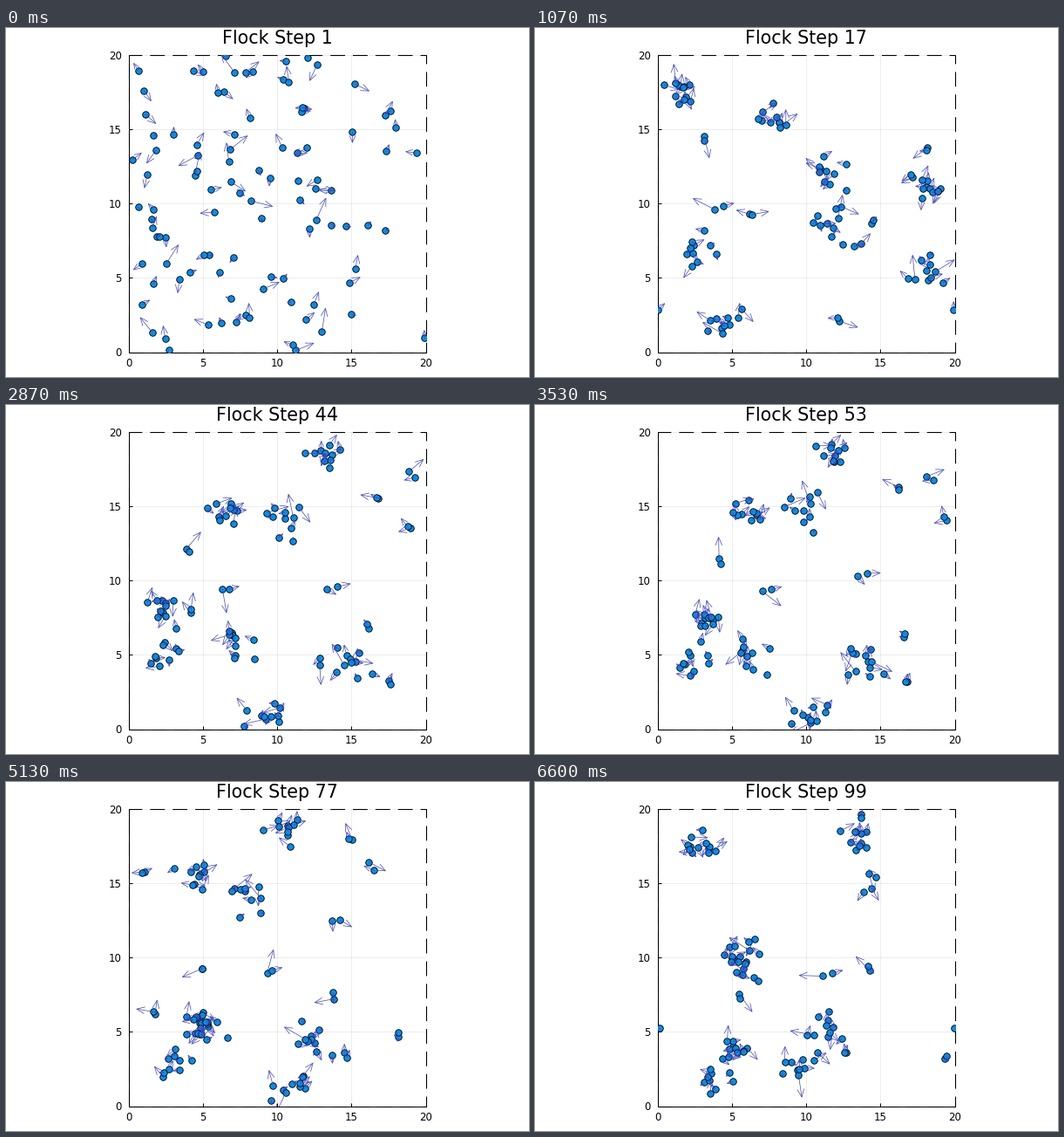
Animation of 600 by 400 pixels, one loop 6.67 s. Source, as a matplotlib script:

```python
import numpy as np
import matplotlib.pyplot as plt
from matplotlib.animation import FuncAnimation
from matplotlib.collections import LineCollection

W, H, DPI = 600, 400, 100
STEPS, LOOP = 100, 6670
SIDE = 20
LEFT, TOP, BOX = 141, 31, 340.5
UNIT = BOX / SIDE
PX = 72 / DPI
GATHERED = 17

rng = np.random.default_rng(11)

# Each flock glides on a parabola through its centre at three moments
MOMENTS = np.array([28, 64, 100])
CENTRES = np.array([
    [(7.2, 15.2), (5.3, 15.0), (2.8, 17.9)],
    [(17.3, 18.0), (10.5, 18.7), (13.4, 18.0)],
    [(11.2, 11.2), (9.0, 14.7), (5.6, 9.6)],
    [(9.5, 9.0), (5.5, 4.8), (5.7, 10.0)],
    [(2.3, 6.0), (2.4, 3.7), (3.8, 1.7)],
    [(6.9, 1.6), (11.0, 1.2), (9.5, 3.0)],
    [(16.6, 4.6), (13.0, 4.0), (11.2, 5.0)],
    [(0.2, 9.8), (4.2, 6.4), (5.3, 3.8)],
])
FLOCKS, FLOCK_SIZE = len(CENTRES), 10
PAIRS = 10
N = FLOCKS * FLOCK_SIZE + PAIRS * 2


def polar(r, a):
    return np.stack([r * np.cos(a), r * np.sin(a)], axis=-1)


def wrapped(d):
    return (d + SIDE / 2) % SIDE - SIDE / 2


def paths():
    """Quadratic coefficients for the flocks and the straight-flying pairs."""
    knots = CENTRES.transpose(1, 0, 2).reshape(len(MOMENTS), -1)
    curved = np.polyfit(MOMENTS, knots, 2).reshape(3, FLOCKS, 2)
    place = rng.uniform(0, SIDE, (PAIRS, 2))
    speed = polar(0.09, rng.uniform(0, 2 * np.pi, PAIRS))
    straight = np.stack([0 * speed, speed, place])
    return np.concatenate([curved, straight], axis=1)


PATHS = paths()
group = np.repeat(np.arange(FLOCKS + PAIRS),
                  [FLOCK_SIZE] * FLOCKS + [2] * PAIRS)
spread = np.where(group < FLOCKS, 0.65, 0.2)[:, None]
offset = rng.normal(0, spread, (N, 2))
phase = rng.uniform(0, 2 * np.pi, (N, 2))

reach = np.clip(rng.rayleigh(0.55, N), 0.15, 1.6)
aim = rng.uniform(0, 2 * np.pi, N)
turn = rng.normal(0, 0.04, N)


def flocked(step):
    a, b, c = PATHS
    centre = (a * step + b) * step + c
    sway = 0.4 * spread * np.sin(0.15 * step + phase)
    return centre[group] + offset + sway


def nearest_starts(goal):
    """Scatter the birds, then swap starts while that shortens the trips."""
    home = rng.uniform(0, SIDE, (N, 2))
    cost = (wrapped(goal[:, None] - home[None]) ** 2).sum(axis=2)
    pick = np.arange(N)
    for _ in range(6):
        for i in range(N):
            for j in range(i):
                a, b = pick[i], pick[j]
                if cost[i, b] + cost[j, a] < cost[i, a] + cost[j, b]:
                    pick[i], pick[j] = b, a
    return home[pick]


GOAL = flocked(GATHERED)
HOME = nearest_starts(GOAL)


def positions(step):
    if step < GATHERED:
        u = (step - 1) / (GATHERED - 1)
        return (HOME + u * wrapped(GOAL - HOME)) % SIDE
    return flocked(step) % SIDE


def arrows(pos, step):
    a = aim + turn * step
    tip = pos + polar(reach, a)
    barb = np.minimum(10 / UNIT, 0.7 * reach)
    left = tip - polar(barb, a + 0.4)
    right = tip - polar(barb, a - 0.4)
    shafts = np.stack([pos, tip], axis=1)
    heads = np.stack([left, tip, right], axis=1)
    return list(shafts) + list(heads)


fig = plt.figure(figsize=(W / DPI, H / DPI), dpi=DPI, facecolor="white")
ax = fig.add_axes([LEFT / W, 1 - (TOP + BOX) / H, BOX / W, BOX / H])
ax.set(xlim=(0, SIDE), ylim=(0, SIDE))
ticks = range(0, SIDE + 1, 5)
ax.set_xticks(ticks)
ax.set_yticks(ticks)
ax.tick_params(direction="in", length=4 * PX, width=PX, labelsize=11.8 * PX,
               labelfontfamily="DejaVu Sans")
ax.tick_params(axis="x", pad=6 * PX)
ax.tick_params(axis="y", pad=8 * PX)
ax.grid(color="black", alpha=0.1, lw=0.5)
ax.set_axisbelow(True)
for side in ("top", "right"):
    ax.spines[side].set_visible(False)
for side in ("left", "bottom"):
    ax.spines[side].set_linewidth(PX)

ax.plot([0, SIDE, SIDE, 0, 0], [0, 0, SIDE, SIDE, 0], color="black",
        lw=1.1 * PX, dashes=(15.3, 8.2), dash_capstyle="butt",
        clip_on=False, zorder=2)

dots, = ax.plot([], [], "o", ms=7.5 * PX, mfc="#0092f2", mec="black",
                mew=0.9 * PX, zorder=3)
darts = LineCollection([], colors="#3d46c4", linewidths=0.7 * PX, zorder=4)
ax.add_collection(darts, autolim=False)
title = fig.text((LEFT + BOX / 2) / W, 1 - 18 / H, "", ha="center",
                 va="baseline", family="DejaVu Sans", size=20.6 * PX)


def draw(i):
    step = i + 1
    pos = positions(step)
    dots.set_data(pos[:, 0], pos[:, 1])
    darts.set_segments(arrows(pos, step))
    title.set_text(f"Flock Step {step}")
    return dots, darts, title


anim = FuncAnimation(fig, draw, frames=STEPS, interval=LOOP / STEPS,
                     repeat=True, repeat_delay=0, blit=False)
plt.show()
```
